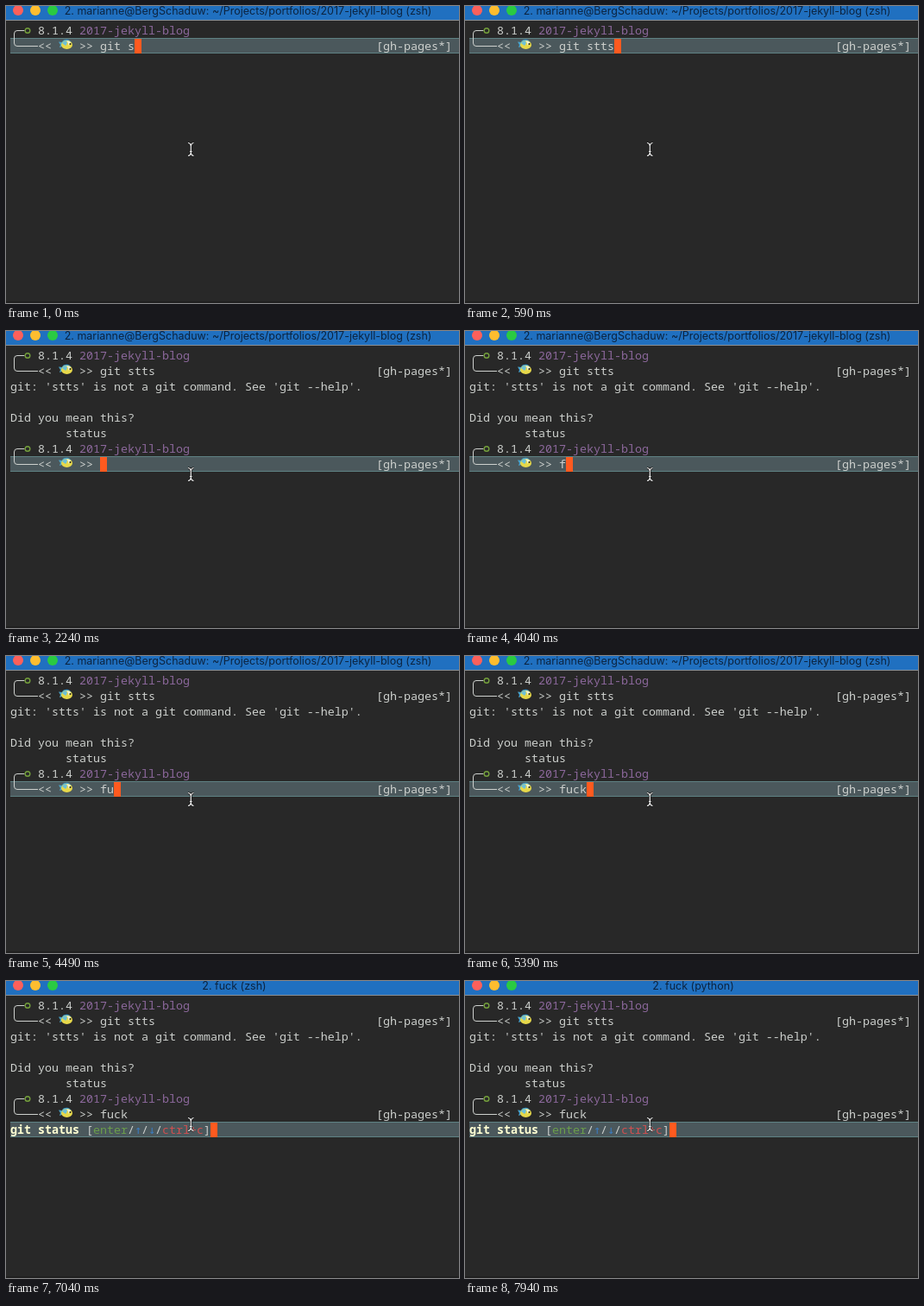
Recreate the animation shown at these times as an HTML page. Size 525x344 px, loop 8000 ms.

```html
<!DOCTYPE html>
<html lang="en">
<meta charset="utf-8">
<title>Terminal</title>
<style>
html, body { margin: 0; width: 100%; height: 100%; overflow: hidden; background: #282828; }
svg { display: block; }
text { white-space: pre; font: 13.333px "Noto Sans Mono", "DejaVu Sans Mono", monospace; fill: #cdd0cd; font-variant-ligatures: none; }
#title { font: 12.5px Inter, sans-serif; fill: #0c2440; text-anchor: middle; }
.dir { fill: #8c689c; }
.cmd { fill: #ffffd2; font-weight: 700; }
.yes { fill: #6b9e4b; }
.arrow { fill: #3c7cc0; font-family: "DejaVu Sans Mono", monospace; }
.no { fill: #d05050; }
.line { fill: none; stroke: #cdd0cd; stroke-width: 1; }
</style>
<svg width="525" height="344" viewBox="0 0 525 344">
  <defs>
    <g id="fish">
      <path d="M65 42Q66 38.5 71 38.8Q75 39.5 76 43Z" fill="#3f9fd0"/>
      <path d="M66 42L61 41.5L63 45L62 48L66 46.5Z" fill="#49a6cf"/>
      <ellipse cx="70.5" cy="45" rx="6.5" ry="5" fill="#e6d84a"/>
      <path d="M65 43Q67 40 70 40.2Q72 43 69 46Z" fill="#6cc0d8"/>
      <path d="M70 40.2Q73.5 40.5 75 42L72 46Q73 43 70 40.2Z" fill="#eef2dc"/>
      <circle cx="74.5" cy="44" r="1" fill="#222"/>
    </g>
    <path id="beam" d="M211 158.5Q214 158.8 214.3 162V170Q214 173.2 211 173.5M217.5 158.5Q214.6 158.8 214.3 162M214.3 170Q214.6 173.2 217.5 173.5M213 168.5H215.6" fill="none"/>
  </defs>
  <rect width="525" height="344" fill="#282828"/>
  <rect y="342" width="525" height="2" fill="#202020"/>
  <rect width="525" height="16" fill="#2070c0"/>
  <rect y="16" width="525" height="1" fill="#8a9096"/>
  <circle cx="14" cy="5" r="6" fill="#fc605b"/>
  <circle cx="34" cy="5" r="6" fill="#fdbd2f"/>
  <circle cx="54" cy="5" r="6" fill="#2aca42"/>
  <text id="title" y="10"></text>
  <g id="screen"></g>
  <use href="#beam" stroke="#181818" stroke-width="2.6"/>
  <use href="#beam" stroke="#f0f0f0" stroke-width="1.2"/>
</svg>
<script>
const LOOP = 8000, CELL = 8, LEFT = 5, ROW = 18, TOP = 19;
const HOME = "2. marianne@BergSchaduw: ~/Projects/portfolios/2017-jekyll-blog (zsh)";
const title = document.getElementById("title");
const screenBox = document.getElementById("screen");

const text = (row, col, s, cls = "") =>
  `<text x="${LEFT + col * CELL}" y="${TOP + row * ROW + 14}" class="${cls}">${s}</text>`;

const bar = (row, col) => {
  const y = TOP + row * ROW;
  return `<rect x="5" y="${y}" width="520" height="18" fill="#5f8284"/>
    <rect x="5" y="${y + 1}" width="520" height="16" fill="#4b585c"/>
    <rect x="${LEFT + col * CELL}" y="${y + 1}" width="8" height="17" fill="#ff5a1f"/>`;
};

const prompt = (row, cmd) =>
  `<g transform="translate(0 ${row * ROW})">
    <path class="line" d="M21.5 28.5H13Q9.5 28.5 9.5 32V43Q9.5 46.5 13 46.5H37"/>
    <circle cx="25" cy="28.5" r="2.8" fill="none" stroke="#74a03c" stroke-width="1.4"/>
    <use href="#fish"/>
  </g>` +
  text(row, 4, "8.1.4") + text(row, 10, "2017-jekyll-blog", "dir") +
  text(row + 1, 4, "&lt;&lt;") + text(row + 1, 10, "&gt;&gt;") +
  text(row + 1, 13, cmd) + text(row + 1, 53, "[gh-pages*]");

const span = (cls, s) => `<tspan class="${cls}">${s}</tspan>`;
const choice = span("cmd", "git status") + " [" + span("yes", "enter") + "/" +
  span("arrow", "↑") + "/" + span("arrow", "↓") + "/" + span("no", "ctrl+c") + "]";

// Part of a word typed so far, one letter per time
const typed = (word, times, t) => word.slice(0, times.filter(k => t >= k).length);

function view(t) {
  const first = "git s" + typed("tts", [150, 300, 590], t);
  if (t < 2090) return bar(1, 13 + first.length) + prompt(0, first);
  const output = prompt(0, first) +
    text(2, 0, "git: 'stts' is not a git command. See 'git --help'.") +
    text(4, 0, "Did you mean this?") + text(5, 8, "status");
  if (t < 2240) return bar(6, 0) + output;
  const second = typed("fuck", [4040, 4490, 4940, 5390], t);
  const both = output + prompt(6, second);
  if (t < 6740) return bar(7, 13 + second.length) + both;
  return t < 7040 ? bar(8, 0) + both : bar(8, 29) + both + text(8, 0, choice);
}

let shown;
function draw(now) {
  const t = now % LOOP, html = view(t);
  title.textContent = t < 6740 ? HOME : t < 7940 ? "2. fuck (zsh)" : "2. fuck (python)";
  title.setAttribute("x", t < 6740 ? 280.5 : 264.5);
  if (html !== shown) screenBox.innerHTML = shown = html;
  requestAnimationFrame(draw);
}
draw(0);
</script>
</html>
```
